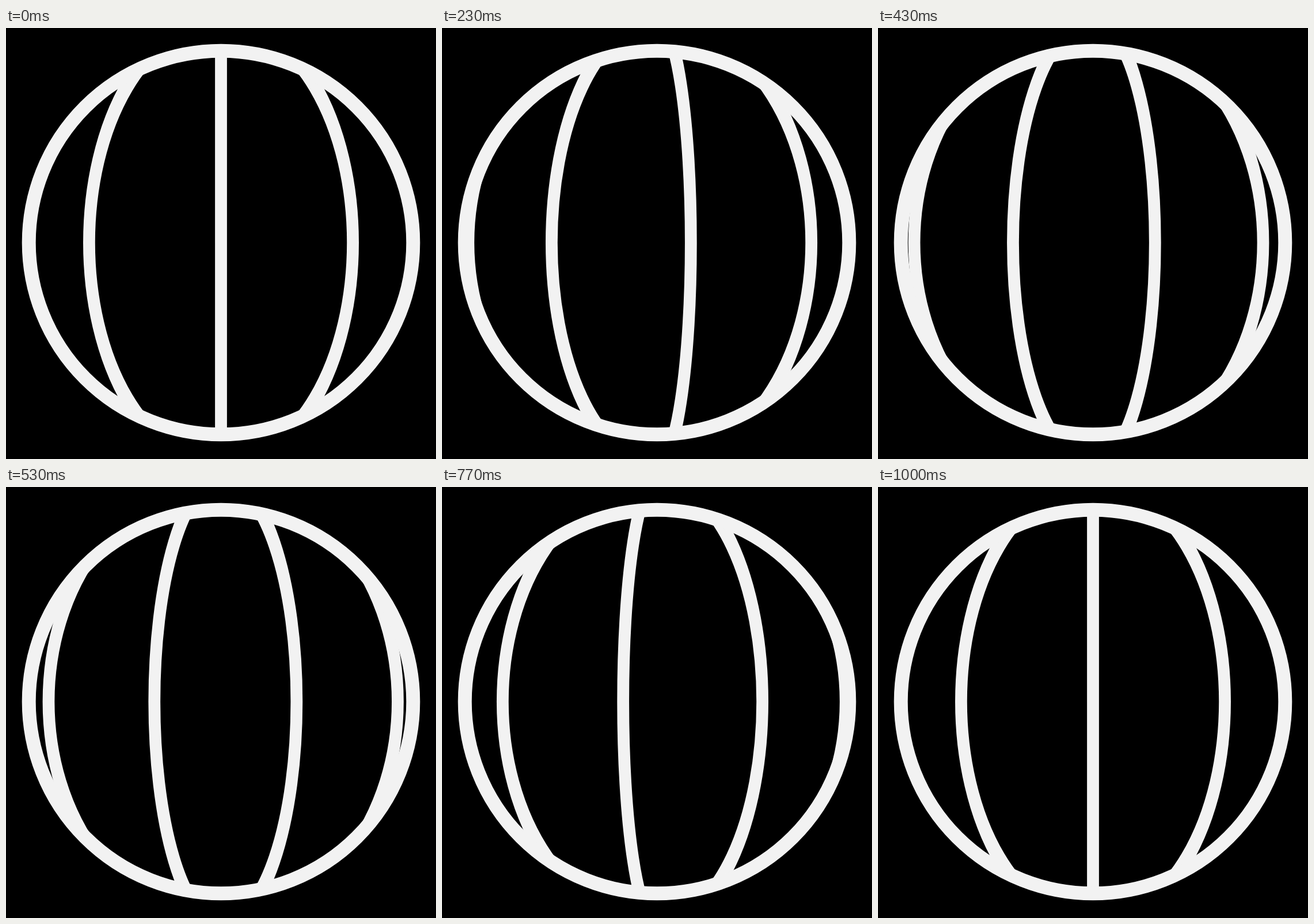
These frames come from a looping animation (747 by 750 pixels, 1.03 s). An HTML page with a canvas:

```html
<!DOCTYPE html>
<html lang="en">
<head>
<meta charset="utf-8">
<title>Turning globe</title>
<style>
  html, body { margin: 0; width: 100%; height: 100%; overflow: hidden; background: #000; }
  canvas { display: block; }
</style>
</head>
<body>
<canvas width="747" height="750"></canvas>
<script>
const ctx = document.querySelector('canvas').getContext('2d');
const LOOP = 1030, STEPS = 30;
const CENTER = 373.5, RADIUS = 333.8;
const SPACING = Math.PI / 5; // angle between meridians
const DISTANCE = 6.4;        // viewer, in globe radii
const HALF_HEIGHT = 388;     // meridians run past the rim
const STRETCH = 1.5;         // lines thicken where they slant

function meridian(angle) {
  const x = 340.5 * Math.sin(angle) / (1 - Math.cos(angle) / DISTANCE);
  const start = x < 0 ? Math.PI / 2 : -Math.PI / 2;
  ctx.beginPath();
  ctx.ellipse(0, 0, Math.max(Math.abs(x), 0.01), HALF_HEIGHT / STRETCH, 0, start, start + Math.PI);
  ctx.stroke();
}

function draw(step) {
  ctx.fillStyle = '#000';
  ctx.fillRect(0, 0, 747, 750);
  ctx.strokeStyle = '#f2f2f2';

  ctx.save();
  ctx.translate(CENTER, CENTER);
  const disc = new Path2D();
  disc.arc(0, 0, RADIUS, 0, 2 * Math.PI);

  ctx.save();
  ctx.clip(disc);
  ctx.scale(1, STRETCH);
  ctx.lineWidth = 20.8;
  for (let i = -2; i <= 1; i++) meridian((i + step / STEPS) * SPACING);
  ctx.restore();

  ctx.lineWidth = 24;
  ctx.stroke(disc);
  ctx.restore();
}

// 30 steps per second, with step times rounded to 10 ms
function tick() {
  const ticks = Math.floor(performance.now() % LOOP / 10);
  draw(Math.floor(0.3 * ticks + 0.15));
  requestAnimationFrame(tick);
}
tick();
</script>
</body>
</html>
```
